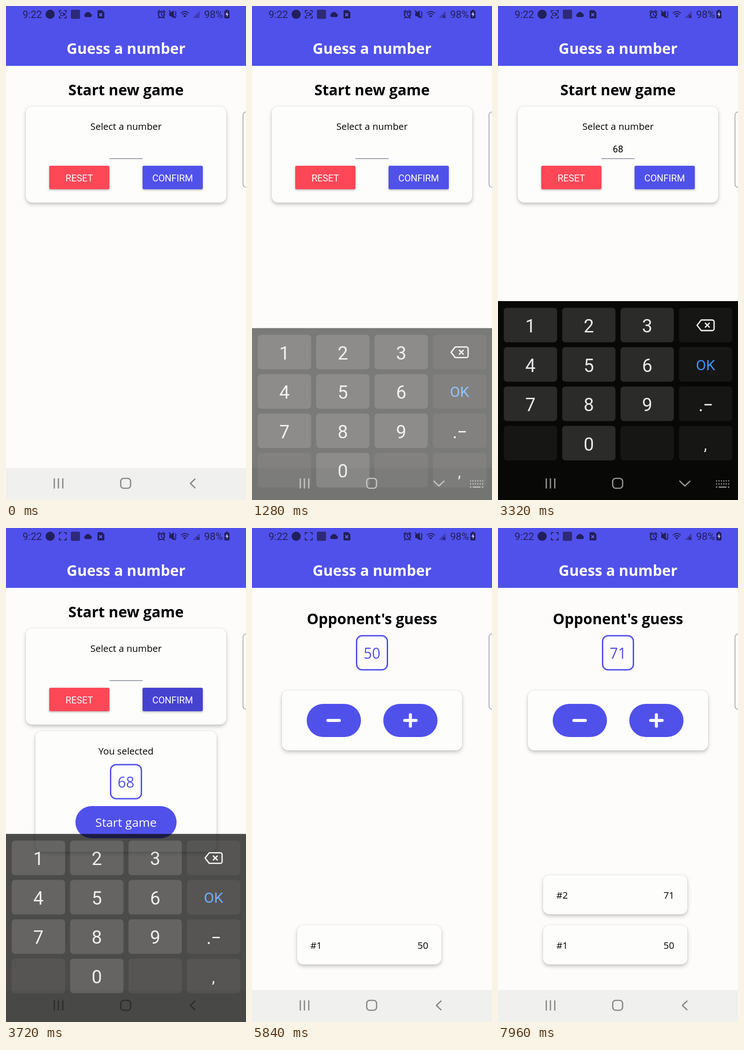
Animation of 522x1073 px, one loop 8000 ms. Source, as an HTML page:

```html
<!DOCTYPE html>
<html lang="en">
<head>
<meta charset="utf-8">
<style>
html, body { margin: 0; height: 100%; overflow: hidden; background: #fdfcfb; }
svg { display: block; width: 100vw; height: 100vh; }
text { font-family: "Open Sans", sans-serif; font-size: 20.5px; white-space: pre; }
.mid { text-anchor: middle; }
.end { text-anchor: end; }
.title { font-size: 32.1px; font-weight: 700; }
.ui { font-family: Roboto, sans-serif; font-size: 20.3px; }
.status { font-size: 22px; }
.digit { font-size: 40px; }
.big { font-size: 31.9px; }
.white { fill: #fff; }
.primary { fill: #5051eb; }
.card { fill: #fdfdfb; filter: drop-shadow(0 4px 4px #0003) drop-shadow(0 0 1px #0002); }
.raised { filter: drop-shadow(0 2px 2px #0004); }
.box { fill: none; stroke: #5051eb; stroke-width: 3; }
.line { fill: none; stroke-linecap: round; stroke-linejoin: round; }
</style>
</head>
<body>
<svg viewBox="0 0 522 1073" preserveAspectRatio="none">
  <rect width="522" height="1073" fill="#fdfcfb"/>
  <rect class="primary" width="522" height="130"/>
  <text class="title mid white" x="261" y="104">Guess a number</text>

  <g id="status" fill="#211f5c" stroke-width="2">
    <text class="ui status" x="36" y="26">9:22</text>
    <circle cx="96" cy="18" r="10"/>
    <path class="line" stroke="#211f5c" d="M116 14v-4h4M127 10h4v4M131 22v4h-4M120 26h-4v-4"/>
    <path id="camera" class="line" stroke="#211f5c" stroke-width="1.5" d="M119 15h6v6h-6zM125 18l3.500-2v4z"/>
    <rect x="141" y="8" width="20" height="20" rx="3" fill="#2e2a78"/>
    <path d="M173 24a4 4 0 0 1-.5-7.500a6.500 6.500 0 0 1 11.500 0a4 4 0 0 1 .5 7.500z"/>
    <path d="M201 9h8l5 5v11a2 2 0 0 1-2 2h-11a2 2 0 0 1-2-2v-14a2 2 0 0 1 2-2z"/>
    <path d="M203 16l6 6M209 16l-6 6" stroke="#6667ee"/>
    <g class="line" stroke="#211f5c">
      <circle cx="338" cy="18.500" r="6.500" stroke-width="2.600"/>
      <path d="M338 15v4l3 2M330 13l4-3.500M346 13l-4-3.500M333 25l-1.500 1.500M343 25l1.500 1.500"/>
      <path d="M355 10l13 16"/>
      <path d="M356 15h3l5-4v14l-5-4h-3z" fill="#211f5c"/>
      <path d="M368 12l2 3-2 3 2 3-2 3" stroke-width="1.800"/>
      <path d="M381 15q8-6.500 16 0M384 18.500q5-4 10 0M387 22q2-1.500 4 0"/>
    </g>
    <path d="M388.500 25l-2.500-3h5z"/>
    <path d="M406 26l15-15v15z" opacity=".4"/>
    <path id="noSignal" d="M415 20l6 6M421 20l-6 6" stroke="#211f5c" stroke-width="1.600"/>
    <text class="ui status" x="431" y="26">98%</text>
    <path d="M477 10h1.500v-2h4v2h1.500a2 2 0 0 1 2 2v13a2 2 0 0 1-2 2h-7a2 2 0 0 1-2-2v-13a2 2 0 0 1 2-2z"/>
    <path d="M481.500 12l-4.500 7h3v5l4-7h-2.500z" fill="#b9b9fa"/>
  </g>

  <g id="startScreen">
    <text class="title mid" x="261" y="194">Start new game</text>
    <rect class="card" x="43" y="218" width="436" height="209" rx="14"/>
    <text class="mid" x="261" y="268.500">Select a number</text>
    <text id="entry" class="ui mid" x="261" y="318"></text>
    <rect id="cursor" x="260.500" y="297" width="3" height="28" fill="#0c8272"/>
    <path d="M225 331.500h72" stroke="#7a7e90" stroke-width="1.500"/>
    <rect class="raised" x="94" y="347" width="131" height="51" rx="3" fill="#fe4757"/>
    <text class="ui mid white" x="159.500" y="380.500">RESET</text>
    <rect id="confirm" class="raised primary" x="297" y="347" width="131" height="51" rx="3"/>
    <text class="ui mid white" x="362.500" y="380.500">CONFIRM</text>
    <g id="summary">
      <rect class="card" x="64" y="441" width="394" height="262" rx="14"/>
      <text class="mid" x="261" y="492">You selected</text>
      <rect class="box" x="227.500" y="514" width="67" height="74" rx="12"/>
      <text class="big mid primary" x="261" y="564">68</text>
      <g id="startButton">
        <rect class="primary" x="151" y="604" width="220" height="70" rx="35"/>
        <text class="mid white" x="261" y="649" style="font-size:26.300px">Start game</text>
      </g>
    </g>
  </g>

  <g id="gameScreen">
    <text class="title mid" x="261" y="208.500">Opponent's guess</text>
    <rect class="box" x="227.500" y="234" width="67" height="74" rx="12"/>
    <text id="guess" class="big mid primary" x="261" y="284"></text>
    <rect class="card" x="65" y="353" width="392" height="130" rx="14"/>
    <g class="line" stroke="#fff" stroke-width="6.500">
      <rect class="primary" x="119" y="382" width="118" height="72" rx="36" stroke="none"/>
      <path d="M165 418h25"/>
      <g id="plus">
        <rect class="primary" x="285.500" y="382" width="118" height="72" rx="36" stroke="none"/>
        <path d="M332 418h25M344.500 405.500v25"/>
      </g>
    </g>
    <g id="row2">
      <rect class="card" x="98" y="754" width="314" height="85" rx="14"/>
      <text x="127" y="804.500">#2</text>
      <text class="end" x="383.500" y="804.500">71</text>
    </g>
    <rect class="card" x="98" y="863" width="314" height="85" rx="14"/>
    <text x="127" y="913.500">#1</text>
    <text class="end" x="383.500" y="913.500">50</text>
  </g>

  <rect x="515.500" y="230" width="20" height="164" rx="7" fill="#fdfdfb" stroke="#999" stroke-width="1.500"/>
  <rect y="1003.500" width="522" height="70" fill="#f0f0ee"/>

  <g id="keyboard">
    <rect y="641" width="522" height="700" fill="#080807"/>
    <g id="keys"></g>
    <g class="line" stroke="#f2f2f2" stroke-width="2.800">
      <path d="M442 682h24a4 4 0 0 1 4 4v15a4 4 0 0 1-4 4h-24l-9-11.500z"/>
      <path d="M451 689l8.500 8.500M459.500 689l-8.500 8.500"/>
    </g>
    <text class="ui mid" x="451.500" y="790.500" fill="#3d92fb" style="font-size:32px">OK</text>
    <path d="M439 876h4v4h-4zM449 864.500h16v3h-16z" fill="#f2f2f2"/>
    <text class="ui mid" x="451" y="965" fill="#f2f2f2" style="font-size:34px">,</text>
  </g>

  <g id="nav" class="line" stroke-width="2.700">
    <path stroke-linecap="butt" d="M105 1026v22M114 1026v22M123.500 1026v22"/>
    <rect x="249.500" y="1026" width="21.500" height="21.500" rx="6.500"/>
    <path id="back" d="M411 1027.500l-10 9.500 10 9.500"/>
    <g id="hide">
      <path d="M395.500 1032l11 10.500 11-10.500"/>
      <path stroke-linecap="butt" stroke-dasharray="2.600 2.700" d="M474 1031.500h29M474 1038h29"/>
      <path stroke-linecap="butt" d="M474 1045h3M480 1045h17M500 1045h3"/>
    </g>
  </g>
</svg>
<script>
const $ = id => document.getElementById(id);
const LOOP = 8000, OPEN = 1130, CLOSE = 3665, GAME = 5260, SECOND = 6760;
const typed = [{ key: "6", at: 2440 }, { key: "8", at: 2800 }];

const clamp = v => Math.min(1, Math.max(0, v));
const ramp = (t, from, length) => clamp((t - from) / length);
const show = (id, on) => $(id).style.display = on ? "" : "none";
// Dims while a finger is down, then recovers.
const pressed = (t, down, up) => 1 - 0.4 * (ramp(t, down, 150) - ramp(t, up, 250));

["1", "2", "3", "", "4", "5", "6", "", "7", "8", "9", "", "", "0", "", ""].forEach((label, i) => {
  const x = 12.5 + i % 4 * 127, y = 655.5 + Math.floor(i / 4) * 85.5;
  $("keys").innerHTML +=
    `<rect id="key${label || "-" + i}" x="${x}" y="${y}" width="116" height="75" rx="7" fill="${label ? "#2b2b2a" : "#161615"}"/>` +
    `<text class="ui digit mid" x="${x + 58}" y="${y + 53.5}" fill="#e9e9e9">${label}</text>`;
});

function drawEntry(t) {
  const entered = typed.filter(k => t >= k.at && t < CLOSE);
  const blinkStart = entered.length ? entered[entered.length - 1].at : 1700;
  $("entry").textContent = entered.map(k => k.key).join("");
  $("cursor").setAttribute("x", 260.5 + entered.length * 5.7);
  show("cursor", t >= blinkStart && t < CLOSE && (t - blinkStart) % 1000 < 500);
  for (const { key, at } of typed)
    $("key" + key).setAttribute("fill", t >= at - 40 && t < at + 100 ? "#4a4a49" : "#2b2b2a");
}

function drawKeyboard(t) {
  const visible = ramp(t, OPEN, 285) - ramp(t, CLOSE, 200);
  const up = t >= OPEN && t < CLOSE;
  show("keyboard", visible > 0);
  $("keyboard").setAttribute("opacity", visible);
  $("keyboard").setAttribute("transform", `translate(0 ${223 * (1 - visible) ** 1.77})`);
  show("hide", up);
  show("back", !up);
  $("nav").setAttribute("stroke", !visible ? "#868685" : visible === 1 ? "#989898" : up ? "#c4c4c2" : "#2c2c2b");
}

function draw(t) {
  show("camera", t % 1000 < 500);
  show("noSignal", t >= 600);
  show("startScreen", t < GAME);
  show("gameScreen", t >= GAME);
  show("summary", t >= CLOSE);
  show("row2", t >= SECOND);
  $("guess").textContent = t < SECOND ? "50" : "71";
  $("confirm").style.fill = t >= 3560 && t < 3900 ? "#4642d0" : "";
  $("startButton").setAttribute("opacity", pressed(t, 5100, GAME));
  $("plus").setAttribute("opacity", pressed(t, 6620, SECOND));
  drawEntry(t);
  drawKeyboard(t);
}

const start = performance.now();
function tick() {
  draw((performance.now() - start) % LOOP);
  requestAnimationFrame(tick);
}
tick();
</script>
</body>
</html>
```
